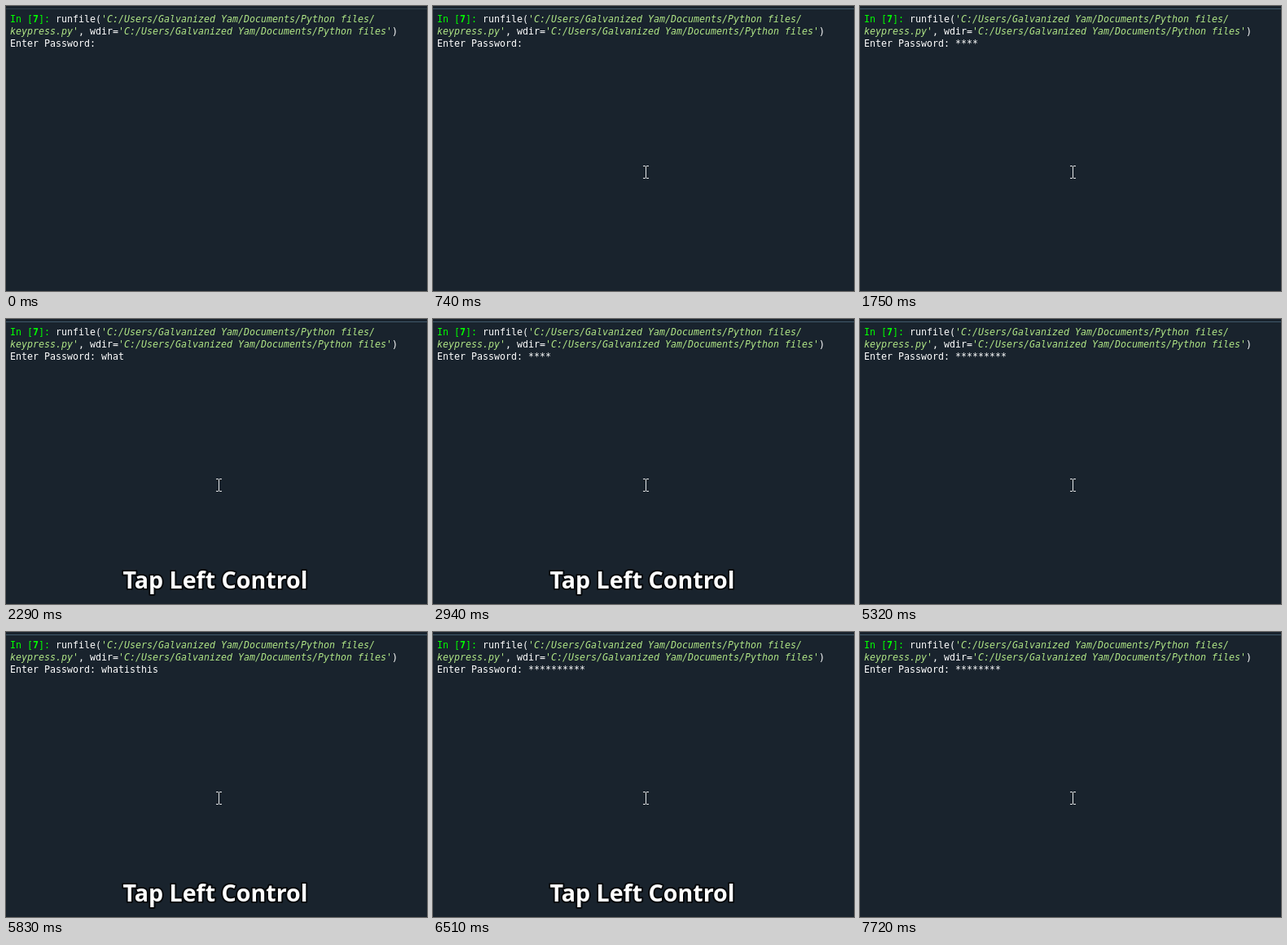
An HTML page with a canvas for the animation above (8 s loop, 517x350 px).

```html
<!DOCTYPE html>
<html lang="en">
<head>
<meta charset="utf-8">
<title>Password prompt</title>
<style>
  html, body { margin: 0; width: 100%; height: 100%; overflow: hidden; background: #19232d; }
  canvas { display: block; }
</style>
</head>
<body>
<canvas id="stage" width="517" height="350"></canvas>
<script>
const ctx = document.getElementById('stage').getContext('2d');
const LOOP = 8000, LEFT = 5, CHAR = 7, LINE = 15;
const MONO = '11.63px "DejaVu Sans Mono", monospace';
const WHITE = '#ffffff', LIME = '#00ff00', STRING = '#b0e686';
const FOLDER = 'C:/Users/Galvanized Yam/Documents/Python files';
const PASSWORD = 'whatisthis';

// Moments in ms at which keys go down; each Control tap is a press and a release.
const letterKeys = [1440, 1670, 1670, 1750, 3740, 4090, 4840, 4940, 5320, 5420];
const backspaces = [7580, 7720];
const controlKey = [2290, 2690, 2940, 3270, 5830, 6190, 6510, 6840];
const POINTER_ENTERS = 40;

const passed = (times, t) => times.filter(time => time <= t).length;
const progress = (from, to, t) => Math.min(1, Math.max(0, (t - from) / (to - from)));

function write(text, column, row, color = WHITE, style = '') {
  ctx.font = `${style} ${MONO}`;
  ctx.fillStyle = color;
  ctx.fillText(text, LEFT + column * CHAR, 20 + row * LINE);
}

function drawConsole(entry) {
  write('In [', 0, 0, LIME);
  write('7', 4, 0, LIME, 'bold');
  write(']:', 5, 0, LIME);
  write('runfile(', 8, 0);
  write(`'${FOLDER}/`, 16, 0, STRING, 'italic');
  write("keypress.py'", 0, 1, STRING, 'italic');
  write(', wdir=', 12, 1);
  write(`'${FOLDER}'`, 19, 1, STRING, 'italic');
  write(')', 67, 1);
  write(`Enter Password: ${entry}`, 0, 2);
}

function drawPointer(t) {
  const remaining = (1 - progress(POINTER_ENTERS, 180, t)) ** 2;
  const settle = 2 * (1 - progress(610, 740, t));
  const x = Math.round(261 + 16 * remaining);
  const y = Math.round(204 + settle + 132 * remaining);
  ctx.fillStyle = '#e4e6e8';
  ctx.fillRect(x, y - 7, 1, 14);
  for (const edge of [y - 8, y + 7]) {
    ctx.fillRect(x - 3, edge, 3, 1);
    ctx.fillRect(x + 1, edge, 3, 1);
  }
}

function drawCaption() {
  const label = ['Tap Left Control', 143.5, 331];
  ctx.font = 'bold 28.6px "Open Sans", "Noto Sans", sans-serif';
  ctx.lineJoin = 'round';
  ctx.lineWidth = 4;
  ctx.strokeStyle = '#06090c';
  ctx.strokeText(...label);
  ctx.fillStyle = WHITE;
  ctx.fillText(...label);
}

function draw(t) {
  const hovered = t >= POINTER_ENTERS;
  const switches = passed(controlKey, t);
  const captionOn = switches % 2 === 1;
  const revealed = Math.ceil(switches / 2) % 2 === 1;
  const count = passed(letterKeys, t) - passed(backspaces, t);

  ctx.fillStyle = '#19232d';
  ctx.fillRect(0, 0, 517, 350);
  ctx.fillStyle = hovered ? '#41596a' : '#32414b';
  ctx.fillRect(0, 3, 517, 1);
  drawConsole(revealed ? PASSWORD.slice(0, count) : '*'.repeat(count));
  if (hovered) drawPointer(t);
  if (captionOn) drawCaption();
}

const start = performance.now();
function tick() {
  draw((performance.now() - start) % LOOP);
  requestAnimationFrame(tick);
}
tick();
</script>
</body>
</html>
```
